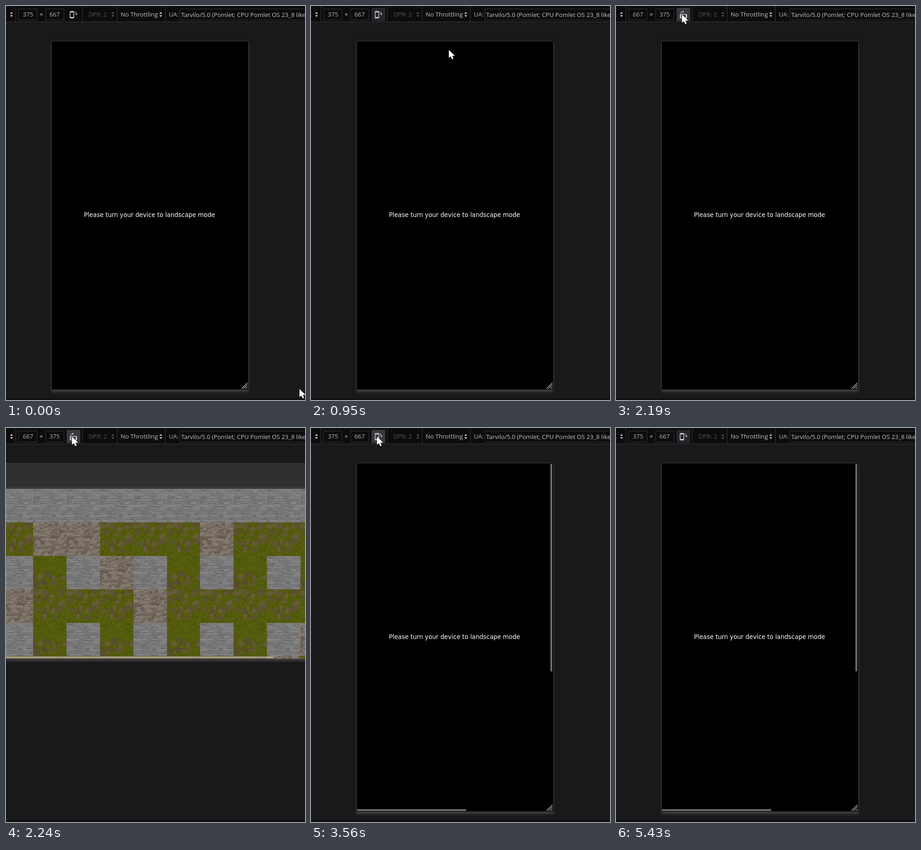
These frames come from a looping animation (652x859 px, 5770 ms). An HTML page with a canvas:

```html
<!DOCTYPE html>
<html lang="en">
<head>
<meta charset="utf-8">
<title>Responsive design mode</title>
<style>
  html, body { margin: 0; width: 100%; height: 100%; overflow: hidden; background: #19191b; }
  canvas { display: block; }
</style>
</head>
<body>
<canvas id="stage" width="652" height="859"></canvas>
<script>
const LOOP = 5770;
const BORDER = '#38383d';
const ctx = document.getElementById('stage').getContext('2d');

let seed = 7;
const rand = (a = 0, b = 1) => a + (b - a) * ((seed = seed * 16807 % 2147483647) / 2147483647);
const rgb = (r, g, b) => `rgb(${r | 0},${g | 0},${b | 0})`;

// --- drawing helpers ---
function box(c, x, y, w, h, color) {
  c.fillStyle = color;
  c.fillRect(x, y, w, h);
}
function frame(x, y, w, h, color = BORDER) {
  ctx.strokeStyle = color;
  ctx.lineWidth = 1;
  ctx.strokeRect(x + .5, y + .5, w - 1, h - 1);
}
function pill(x, y, w, h, r, color) {
  ctx.fillStyle = color;
  ctx.beginPath();
  ctx.roundRect(x, y, w, h, r);
  ctx.fill();
}
function poly(points, color) {
  ctx.fillStyle = color;
  ctx.beginPath();
  points.forEach(([x, y]) => ctx.lineTo(x, y));
  ctx.closePath();
  ctx.fill();
}
function label(text, x, y, color = '#c4c4c8', align = 'left', font = '13.2px "Open Sans", sans-serif') {
  ctx.font = font;
  ctx.textAlign = align;
  ctx.fillStyle = color;
  ctx.fillText(text, x, y);
}
function canvasOf(w, h) {
  const c = document.createElement('canvas');
  c.width = w;
  c.height = h;
  return c;
}

// --- game tiles ---
const TILE = 73;
function texture(paint) {
  const canvas = canvasOf(TILE, TILE);
  paint(canvas.getContext('2d'));
  return canvas;
}
// Soft courses of stones, each with a broken shadow below it.
function masonry(rows, minLen, maxLen, lo, hi, warm, joint) {
  return texture(c => {
    const shade = v => rgb(v + warm, v, v - warm);
    box(c, 0, 0, TILE, TILE, shade((lo + hi) / 2));
    const h = TILE / rows;
    for (let i = 0; i < rows; i++) {
      for (let x = -rand(0, maxLen); x < TILE;) {
        const len = rand(minLen, maxLen), y = i * h + rand(-1, 1);
        c.globalAlpha = .85;
        box(c, x, y, len, h, shade(rand(lo, hi)));
        c.globalAlpha = rand(.2, .9);
        box(c, x + rand(0, 2), y + h - 1.3, len * rand(.5, 1), 1.3, shade(joint));
        x += len;
      }
    }
    for (let i = 0; i < 350; i++) {
      c.globalAlpha = rand(.05, .3);
      box(c, rand(0, TILE), rand(0, TILE), rand(2, 6), 1, shade(rand(joint, hi + 10)));
    }
  });
}
// Grass with bare soil; the soil lies between top and the lower edge.
function meadow(patches, top) {
  return texture(c => {
    const speckle = (count, maxAlpha) => {
      for (let i = 0; i < count; i++) {
        const v = rand(50, 125);
        c.globalAlpha = rand(.1, maxAlpha);
        box(c, rand(0, TILE), rand(0, TILE), 1.5, 1.5, rgb(v * .92, v, 16));
      }
    };
    box(c, 0, 0, TILE, TILE, '#58600f');
    speckle(1800, .7);
    for (let i = 0; i < patches; i++) {
      const v = rand(74, 94);
      c.globalAlpha = rand(.7, .95);
      c.fillStyle = rgb(v + 16, v, v - 22);
      c.beginPath();
      c.ellipse(rand(0, TILE), rand(top, TILE), rand(4, 9), rand(3, 7), rand(0, 3), 0, 7);
      c.fill();
    }
    speckle(900, .4);
  });
}
const stone = masonry(13, 6, 18, 112, 138, 0, 86);
const brick = masonry(19, 4, 13, 88, 138, 10, 72);
const patchy = meadow(26, 0), lush = meadow(16, 34);

const MAP = ['SSSSSSSSSS', 'GBBGGGBGGG', 'SGSBSGSGSG', 'BGGGBGGGGG', 'SGSGSGSGSB', 'GGGGGGGGBG'];
const game = canvasOf(652, 428);
(function paintGame() {
  const c = game.getContext('2d');
  box(c, 0, 0, 652, 428, '#303030');
  box(c, 0, 0, 652, 1, BORDER);
  box(c, 0, 53, 652, 1, '#484848');
  box(c, 0, 56, 652, 1, '#5c5c5c');
  MAP.forEach((row, j) => [...row].forEach((kind, i) => {
    const tile = kind === 'S' ? stone : kind === 'B' ? brick : j % 2 ? patchy : lush;
    c.drawImage(tile, Math.round(-14 + 72.9 * i), Math.round(57.4 + 72.8 * j));
  }));
  box(c, 0, 422, 583, 4, 'rgba(178,170,150,.85)');
  box(c, 0, 427, 652, 1, BORDER);
})();

// --- interface ---
function arrows(x, color) {
  poly([[x - 3.2, 17], [x, 13], [x + 3.2, 17]], color);
  poly([[x - 3.2, 20], [x, 24], [x + 3.2, 20]], color);
}

function rotateIcon(landscape) {
  ctx.save();
  ctx.strokeStyle = ctx.fillStyle = '#c6c6ca';
  ctx.lineWidth = 1.5;
  if (landscape) {
    ctx.translate(139, 27);
    ctx.rotate(-Math.PI / 2);
  } else {
    ctx.translate(139, 11);
  }
  ctx.beginPath();
  ctx.roundRect(.8, .8, 8, 14.4, 1.2);
  ctx.stroke();
  ctx.fillRect(1, 1, 8, 2);
  ctx.fillRect(1, 13, 8, 2);
  ctx.lineWidth = 1.2;
  ctx.beginPath();
  ctx.moveTo(10.5, 2);
  ctx.quadraticCurveTo(14.5, 2, 14.5, 7);
  ctx.stroke();
  ctx.beginPath();
  ctx.moveTo(12, 6);
  ctx.lineTo(17, 6);
  ctx.lineTo(14.5, 9);
  ctx.fill();
  ctx.restore();
}

function toolbar(landscape, button) {
  box(ctx, 0, 0, 652, 34, '#0c0c0d');
  box(ctx, 0, 0, 652, 1, '#1d1d20');
  box(ctx, 0, 34, 652, 1, BORDER);
  for (const x of [21, 166, 242, 347]) box(ctx, x, 1, 1, 33, BORDER);
  box(ctx, 0, 21, 1, 2, '#8a7440');
  arrows(12, '#c4c4c8');
  frame(27, 6, 41, 25);
  frame(86, 6, 41, 25);
  const size = landscape ? [667, 375] : [375, 667];
  label(size[0], 48, 23, '#b4b4b8', 'center');
  label(size[1], 106, 23, '#b4b4b8', 'center');
  label('×', 77, 23, '#c4c4c8', 'center');
  if (button) pill(132, 4, 30, 29, 2, button);
  rotateIcon(landscape);
  label('DPR: 2', 180, 23, '#56565a');
  arrows(233, '#56565a');
  label('No Throttling', 250, 23);
  arrows(337.5, '#c4c4c8');
  label('UA:', 355, 23, '#b4b4b8');
  frame(379, 6, 290, 25);
  label('Tarvilo/5.0 (Pomlet; CPU Pomlet OS 23_8 like', 382, 23.5);
}

function withShadow(draw) {
  ctx.save();
  ctx.shadowColor = 'rgba(155,155,155,.26)';
  ctx.shadowBlur = 4.5;
  ctx.shadowOffsetY = 4.5;
  draw();
  ctx.restore();
}

function portrait(scrollbars) {
  withShadow(() => box(ctx, 99, 76, 430, 761, '#000'));
  frame(99, 76, 430, 761);
  label('Please turn your device to landscape mode', 313, 460, '#fff', 'center', '13.2px "DejaVu Sans", sans-serif');
  if (scrollbars) {
    pill(522, 78, 4, 453, 2, '#6c6c6c');
    pill(100, 831, 239, 4, 2, '#6c6c6c');
  }
  ctx.strokeStyle = '#bdbdbd';
  ctx.lineWidth = 1.3;
  ctx.beginPath();
  for (const d of [13, 9, 4]) {
    ctx.moveTo(526.5 - d, 834.5);
    ctx.lineTo(526.5, 834.5 - d);
  }
  ctx.stroke();
}

// --- pointer ---
// Progress in n discrete steps, the first at t0 and the last at t1.
const stepped = (t, t0, t1, n) => Math.min(1, (Math.floor((t - t0) / (t1 - t0) * (n - 1) + .01) + 1) / n);
const mix = (a, b, p) => a.map((v, i) => v + (b[i] - v) * p);

const START = [640, 835], REST = [638, 774], NEAR = [393, 141], BUTTON = [144, 19], EXIT = [603, 858];

function pointerAt(t) {
  if (t < 70) return START;
  if (t < 130) return [633, 800];
  if (t < 190) return [624, 761];
  if (t < 330) return REST;
  if (t < 950) {
    const p = stepped(t, 330, 880, 9) ** 1.3, bend = [570, 225];
    return mix(mix(REST, bend, p), mix(bend, NEAR, p), p);
  }
  if (t < 4820) return mix(NEAR, BUTTON, 1 - (1 - stepped(t, 950, 1580, 10)) ** 4.4);
  if (t < 5430) return mix(BUTTON, EXIT, stepped(t, 4820, 5360, 9) ** 1.6);
  return null;
}

function pointer([x, y]) {
  const shape = [[0, 0], [0, 17.5], [4, 14], [7, 20.5], [10, 19.3], [7.4, 13], [13, 12.8]];
  poly(shape.map(([dx, dy]) => [x + dx, y + dy]), '#fff');
}

function render(t) {
  box(ctx, 0, 0, 652, 859, '#19191b');
  box(ctx, 0, 855, 652, 4, '#111113');
  const rotated = t >= 2190 && t < 3560;
  const pressed = t >= 2110 && t < 4820;
  toolbar(rotated, pressed ? '#3a3a3e' : t >= 740 ? '#26262a' : null);
  if (t >= 2240 && t < 3560) withShadow(() => ctx.drawImage(game, 0, 76));
  else portrait(t >= 3560);
  if ((t >= 2110 && t < 2190) || (t >= 3430 && t < 3560)) pill(131, 5.5, 27, 27, 13.5, 'rgba(222,208,36,.65)');
  const tip = pointerAt(t);
  if (tip) pointer(tip);
}

function tick() {
  render(performance.now() % LOOP);
  requestAnimationFrame(tick);
}
tick();
</script>
</body>
</html>
```
